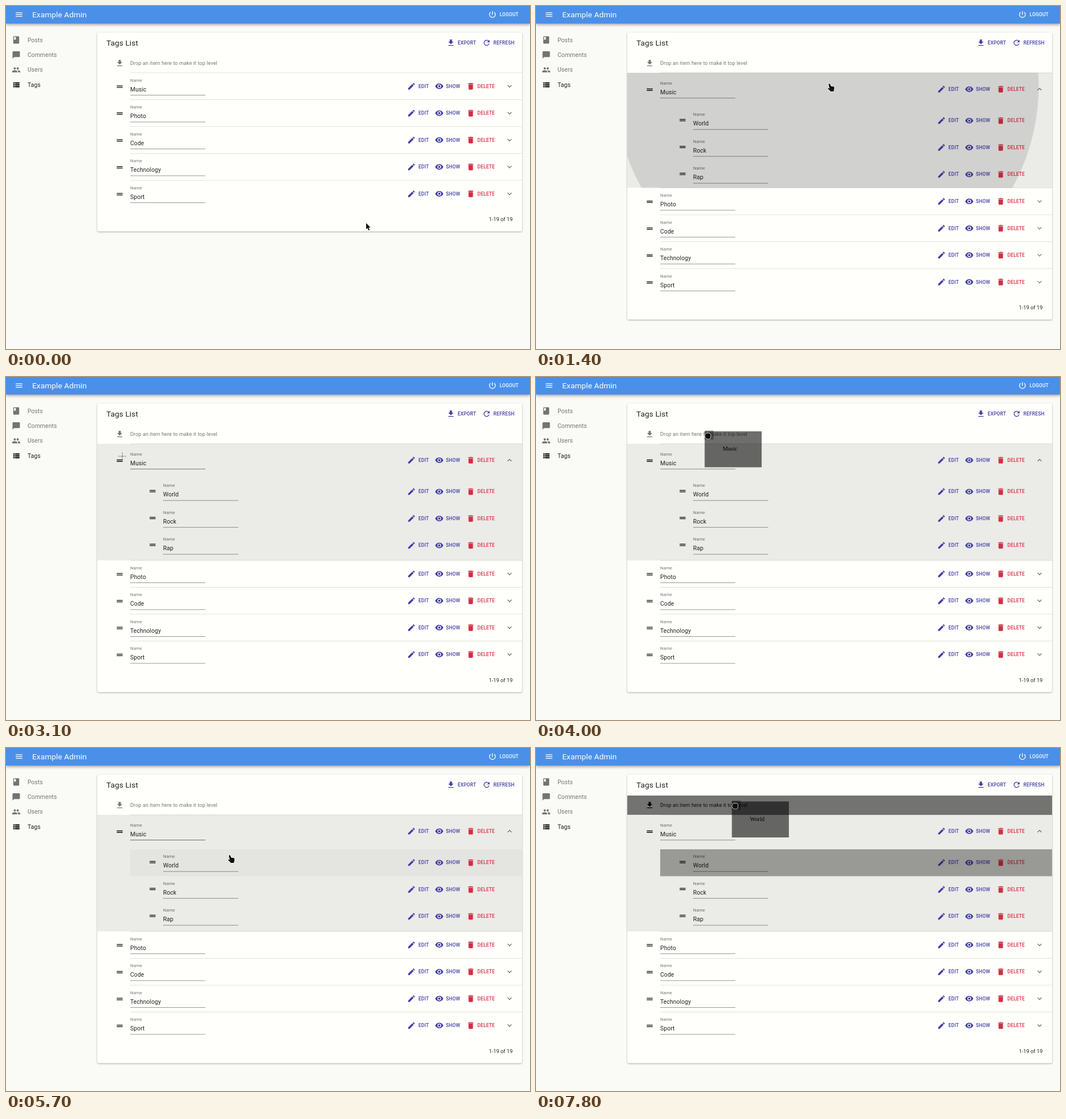
Recreate the animation shown at these times as an HTML page with a canvas. Size 924 by 606 pixels, loop 8000 ms.

```html
<!DOCTYPE html>
<html lang="en">
<head>
<meta charset="utf-8">
<title>Tags List</title>
<style>
html, body { margin: 0; width: 100%; height: 100%; overflow: hidden; background: #fafaf7; }
canvas { display: block; }
</style>
</head>
<body>
<canvas id="stage" width="924" height="606"></canvas>
<script>
const ctx = document.getElementById('stage').getContext('2d');
const LOOP = 8000, STEP = 100, UNIT = 0.65;
const LEFT = 161, RIGHT = 910, TOP = 118, PITCH = 47.5, SUB_TOP = 178.9, GROWTH = 158.5;
const INK = 'rgba(0,0,0,.87)', SOFT = 'rgba(0,0,0,.54)', BLUE = '#413ea5', RED = '#d32f41';
const TAGS = ['Music', 'Photo', 'Code', 'Technology', 'Sport'];
const SUBS = ['World', 'Rock', 'Rap'];
const DRAGS = [
  { name: 'Music', start: 3250, end: 5050 },
  { name: 'World', start: 6675, end: LOOP }
];

// Pointer path: time, x, y
const PATH = [
  [100, 638, 390], [900, 520, 144], [1550, 520, 144], [1900, 500, 215], [2250, 430, 335],
  [2450, 390, 345], [2800, 265, 262], [2950, 226, 172], [3100, 205, 140], [3250, 205, 140],
  [4000, 303, 104], [4300, 325, 99], [4700, 290, 130], [5000, 232, 154], [5100, 214, 152],
  [5600, 352, 167], [5700, 397, 196], [5900, 404, 216], [6300, 402, 212], [6660, 401, 207],
  [6900, 355, 206], [7400, 365, 130], [7700, 358, 103], [7800, 351, 102.5]
];

const ICONS = Object.fromEntries(Object.entries({
  menu: 'M3 18h18v-2H3zM3 13h18v-2H3zM3 6v2h18V6z',
  power: 'M13 3h-2v10h2zM17.8 5.2l-1.4 1.4A7 7 0 1 1 7.6 6.6L6.2 5.2A9 9 0 1 0 17.8 5.2z',
  posts: 'M18 2H6a2 2 0 0 0-2 2v16a2 2 0 0 0 2 2h12a2 2 0 0 0 2-2V4a2 2 0 0 0-2-2zM6 4h5v8l-2.500-1.500L6 12z',
  comments: 'M20 2H4a2 2 0 0 0-2 2v18l4-4h14a2 2 0 0 0 2-2V4a2 2 0 0 0-2-2z',
  users: 'M16 11a3 3 0 1 0 0-6a3 3 0 0 0 0 6zM8 11a3 3 0 1 0 0-6a3 3 0 0 0 0 6z' +
    'M8 13c-2.300 0-7 1.200-7 3.500V19h14v-2.500c0-2.300-4.700-3.500-7-3.500z' +
    'M16 13l-1 .05c1.200.85 2 2 2 3.450V19h6v-2.500c0-2.300-4.700-3.500-7-3.500z',
  list: 'M4 5h4v4H4zM4 10h4v4H4zM4 15h4v4H4zM9 5h12v4H9zM9 10h12v4H9zM9 15h12v4H9z',
  down: 'M19 9h-4V3H9v6H5l7 7zM5 18v2h14v-2z',
  refresh: 'M17.65 6.35A8 8 0 1 0 19.73 14h-2.080A6 6 0 1 1 16.220 7.780L13 11h7V4z',
  handle: 'M4 9h16v2H4zM4 13h16v2H4z',
  edit: 'M3 17.250V21h3.750L17.800 9.950l-3.750-3.750zM20.700 7.050a1 1 0 0 0 0-1.420l-2.340-2.340a1 1 0 0 0-1.420 0l-1.820 1.830 3.750 3.750z',
  show: 'M12 4.500C7 4.500 2.730 7.610 1 12c1.730 4.390 6 7.500 11 7.500s9.270-3.110 11-7.500c-1.730-4.390-6-7.500-11-7.500z' +
    'M12 17a5 5 0 1 1 0-10a5 5 0 0 1 0 10zM12 9a3 3 0 1 0 0 6a3 3 0 0 0 0-6z',
  trash: 'M6 19a2 2 0 0 0 2 2h8a2 2 0 0 0 2-2V7H6zM19 4h-3.500l-1-1h-5l-1 1H5v2h14z',
  more: 'M16.600 8.600L12 13.170 7.400 8.600 6 10l6 6 6-6z',
  less: 'M12 8l-6 6 1.400 1.400L12 10.830l4.600 4.570L18 14z'
}).map(([name, d]) => [name, new Path2D(d)]));

const ARROW = new Path2D('M-3-6.500V4.600L-.5 2.200 1.300 6.500 3.200 5.700 1.400 1.500H4.800z');
const HAND = new Path2D('M-3.600-6.200C-2.700-7-1.800-6.600-1.300-5.600L.2-2.200 4-1.800C5.600-1.500 6.200-.6 6 1' +
  'L5.200 5.800 4.600 7H-.7L-1.600 5.500-5 2.500C-5.700 1.500-4.700.7-3.600 1.200L-2.300 1.900-4-4.900z');
const FIST = new Path2D('M-4.500-1.500C-4.500-4-3-4.600-2-4C-1-5.200.4-5 1-4.200C2-4.900 3.200-4.500 3.500-3.500' +
  'C4.800-3.500 5.200-2.500 5-1L4.200 3.500 3.500 5H-2.200L-3.500 3.300-5.200 1z');

const clamp = v => Math.min(1, Math.max(0, v));

// Standard material curve, cubic-bezier(.4, 0, .2, 1)
function ease(x) {
  x = clamp(x);
  let lo = 0, hi = 1;
  for (let i = 0; i < 20; i++) {
    const u = (lo + hi) / 2, v = 1 - u;
    if (1.2 * v * v * u + 0.6 * v * u * u + u * u * u < x) lo = u; else hi = u;
  }
  return lo * lo * (3 - 2 * lo);
}

const growth = t => GROWTH * ease((t - 1025) / 450);

function pointer(t) {
  if (t <= PATH[0][0]) return PATH[0].slice(1);
  const i = PATH.findIndex(p => p[0] >= t);
  if (i < 0) return PATH[PATH.length - 1].slice(1);
  const [t0, x0, y0] = PATH[i - 1], [t1, x1, y1] = PATH[i];
  const k = (t - t0) / (t1 - t0);
  return [x0 + (x1 - x0) * k, y0 + (y1 - y0) * k];
}

// Share of the last 150 ms the pointer spent inside a box
function hover(t, x0, x1, y0, y1) {
  let n = 0;
  for (let k = 0; k < 5; k++) {
    const at = t - k * 35, [px, py] = pointer(at), d = growth(at);
    const x = px - 2, y = py - 6;
    if (x > x0 && x < x1 && y > y0(d) && y < y1(d)) n++;
  }
  return n / 5;
}

function fill(color, x, y, w, h) {
  ctx.fillStyle = color;
  ctx.fillRect(x, y, w, h);
}

const shade = (alpha, ...box) => alpha > 0 && fill(`rgba(0,0,0,${alpha})`, ...box);

// cy is the middle of the capitals
function text(str, x, cy, size, color = INK, weight = 400, spacing = 0.0094) {
  ctx.font = `${weight} ${size}px Roboto, sans-serif`;
  ctx.letterSpacing = spacing * size + 'px';
  ctx.fillStyle = color;
  ctx.fillText(str, x, cy + size * 0.355);
}

function icon(name, x, y, color) {
  ctx.save();
  ctx.translate(x - 12 * UNIT, y - 12 * UNIT);
  ctx.scale(UNIT, UNIT);
  ctx.fillStyle = color;
  ctx.fill(ICONS[name], 'evenodd');
  ctx.restore();
}

function button(name, label, x, textX, y, color) {
  icon(name, x, y, color);
  text(label, textX, y, 8.4, color, 500, 0.026);
}

function clipped(x, y, w, h, draw) {
  ctx.save();
  ctx.beginPath();
  ctx.rect(x, y, w, h);
  ctx.clip();
  draw();
  ctx.restore();
}

function ripple(age, x, y, radius, release) {
  if (age < 0) return;
  const s = ease(age / 550);
  const alpha = (0.1 + 0.2 * s) * (1 - ease((age - release) / 550));
  ctx.fillStyle = `rgba(0,0,0,${alpha})`;
  ctx.beginPath();
  ctx.arc(x, y, radius * s, 0, 7);
  ctx.fill();
}

function row(name, x, y, handleY, line = 0) {
  icon('handle', x - 18.5, y + handleY, '#000');
  text('Name', x, y + 13, 7.8, SOFT);
  text(name, x, y + 29, 10.4);
  shade(0.46 + 0.4 * line, x, y + 39, 132.5, 0.9);
  button('edit', 'EDIT', 715, 727.3, y + 23.8, BLUE);
  button('show', 'SHOW', 764, 775.8, y + 23.8, BLUE);
  button('trash', 'DELETE', 819.5, 831.3, y + 23.8, RED);
}

function chrome() {
  fill('#fafaf7', 0, 0, 924, 606);
  ctx.save();
  ctx.shadowColor = 'rgba(0,0,0,.38)';
  ctx.shadowBlur = 5;
  ctx.shadowOffsetY = 2;
  fill('#4a90e9', 0, 0, 924, 31);
  ctx.restore();
  icon('menu', 23, 15.2, '#fff');
  text('Example Admin', 46.2, 15.2, 13.65, '#fff', 400, 0.0075);
  button('power', 'LOGOUT', 857.7, 870.5, 15, '#fff');
  [['posts', 'Posts'], ['comments', 'Comments'], ['users', 'Users'], ['list', 'Tags']].forEach(([name, label], i) => {
    const color = i === 3 ? INK : SOFT, y = 60 + 26.4 * i;
    icon(name, 18, y, color);
    text(label, 38, y, 10.4, color);
  });
}

function card(d) {
  ctx.save();
  ctx.shadowColor = 'rgba(0,0,0,.32)';
  ctx.shadowBlur = 3;
  ctx.shadowOffsetY = 1;
  ctx.fillStyle = '#fffffc';
  ctx.beginPath();
  ctx.roundRect(LEFT, 47, RIGHT - LEFT, 351.2 + d, 2.6);
  ctx.fill();
  ctx.restore();
  text('Tags List', 177, 65.3, 13.65, INK, 400, 0.0075);
  button('down', 'EXPORT', 784.5, 796.5, 65, BLUE);
  button('refresh', 'REFRESH', 847.5, 859.5, 65, BLUE);
  text('1-19 of 19', 851.5, 377.2 + d, 9.1, INK, 400, 0.0107);
}

function music(t, still, d) {
  const h = PITCH + d, width = RIGHT - LEFT;
  clipped(LEFT, TOP, width, h, () => {
    shade(0.08 * hover(still, LEFT, RIGHT, () => TOP, k => TOP + PITCH + k), LEFT, TOP, width, h);
    const shift = 5.2 * clamp((t - 1025) / 150);
    const line = hover(still, 219, 352, () => 142, () => 164);
    row('Music', 219, TOP + shift, 24.5, line);
    icon(d > 0 ? 'less' : 'more', 888, TOP + shift + 23.8, SOFT);
    if (d > 0) SUBS.forEach((name, i) => {
      const y = SUB_TOP + PITCH * i;
      shade(0.08 * hover(still, 219, RIGHT, () => y, () => y + PITCH), 219, y, RIGHT - 219, PITCH);
      row(name, 277, y - 0.2, 22.9);
      if (!i) clipped(219, y, RIGHT - 219, PITCH, () => ripple(t - 6675, 400, 204, 511, LOOP));
    });
    ripple(t - 1015, 513, 141, 398, 165);
    ripple(t - 3250, 205, 140, 725, 0);
    ripple(t - 6675, 400, 204, 524, 0);
  });
}

function cursor(shape, x, y) {
  ctx.save();
  ctx.translate(x, y);
  ctx.lineJoin = 'round';
  ctx.lineWidth = 1.6;
  ctx.strokeStyle = 'rgba(255,255,255,.85)';
  ctx.stroke(shape);
  ctx.fillStyle = '#111';
  ctx.fill(shape);
  ctx.restore();
}

function ghost(name, x, y) {
  const left = x - 5.6, top = y - 8;
  shade(0.57, left, top, 100.5, 63.5);
  shade(0.35, left, top - 1.5, 15.5, 16);
  ctx.font = '10.4px "Liberation Serif", serif';
  ctx.letterSpacing = '0px';
  ctx.fillStyle = '#000';
  ctx.fillText(name, left + 31.8, top + 34);
}

function draw(t) {
  const d = growth(t), [x, y] = pointer(t);
  const drag = DRAGS.find(g => t >= g.start && t < g.end);
  const still = drag ? drag.start : t;
  const droppable = drag && drag.name === 'World';

  chrome();
  card(d);
  if (droppable && y < TOP) shade(0.55, LEFT, 84, RIGHT - LEFT, TOP - 84);
  icon('down', 200.5, 101, droppable ? '#000' : SOFT);
  text('Drop an item here to make it top level', 219, 101.2, 9.1, droppable ? INK : SOFT, 400, 0.0107);

  music(t, still, d);
  TAGS.forEach((name, i) => {
    const base = TOP + PITCH * i, top = base + (i ? d : 0);
    if (i) {
      shade(0.08 * hover(still, LEFT, RIGHT, k => base + k, k => base + PITCH + k), LEFT, top, RIGHT - LEFT, PITCH);
      row(name, 219, top, 24.5);
      icon('more', 888, top + 23.8, SOFT);
    }
    shade(0.12, 219, top - 0.5, RIGHT - 219, 1);
  });

  if (drag) {
    ghost(drag.name, x, y);
    cursor(FIST, x, y);
  } else if (x < 212 && y < 160) {
    shade(0.4, x - 7, y - 0.5, 14, 1);
    shade(0.4, x - 0.5, y - 7, 1, 14);
  } else {
    cursor(y - 6 > TOP + PITCH * 5 + d ? ARROW : HAND, x, y);
  }
}

function tick(now) {
  draw(Math.floor((now % LOOP) / STEP) * STEP);
  requestAnimationFrame(tick);
}
requestAnimationFrame(tick);
</script>
</body>
</html>
```
